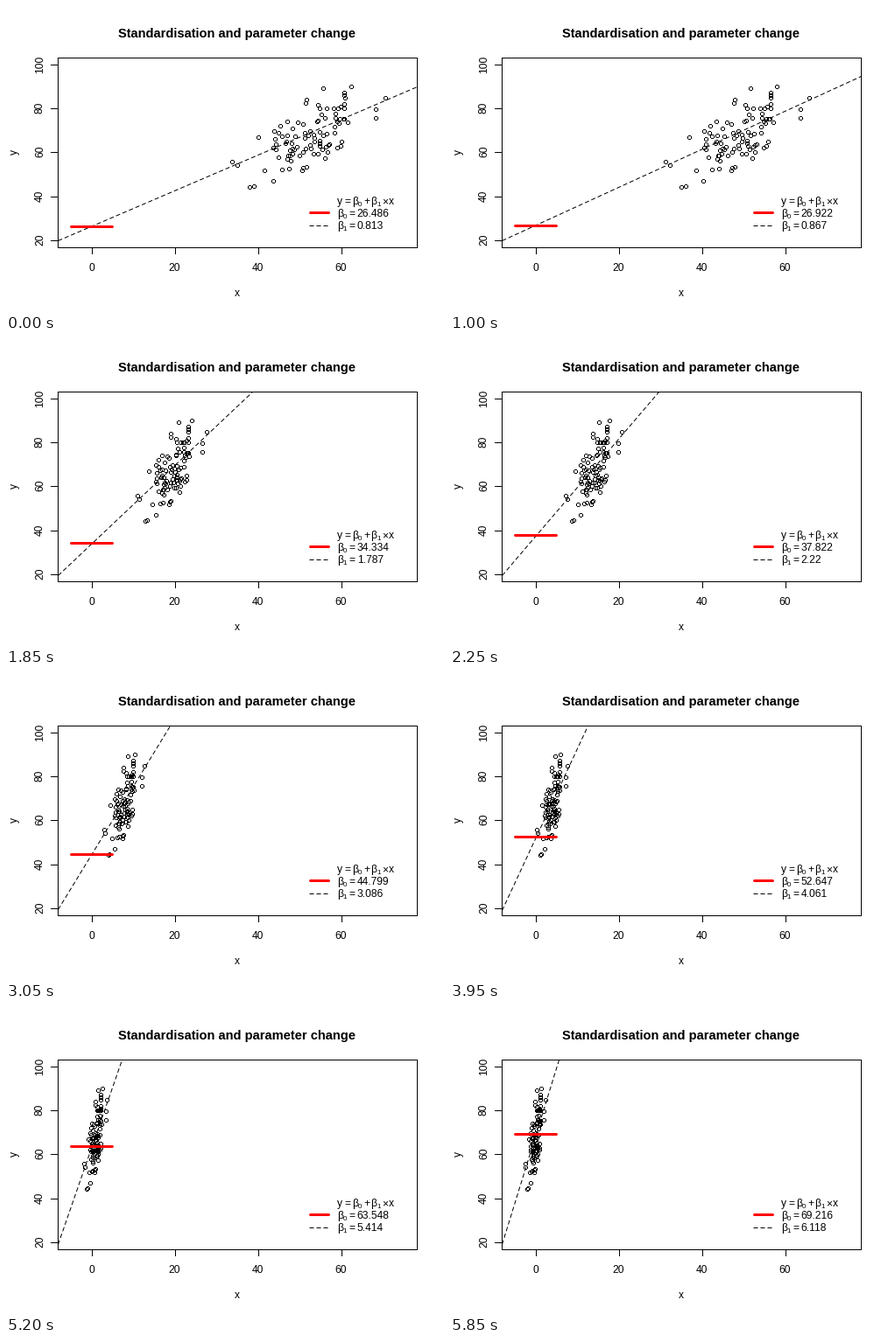
Animation, 500 px wide and 350 px high, one loop 6850 ms. Source, as a matplotlib script:

```python
import numpy as np
import matplotlib.pyplot as plt
from matplotlib.animation import FuncAnimation
from matplotlib.path import Path

W, H, DPI = 500, 350, 100
PX = 72 / DPI  # one pixel in points
STEPS, HOLD, FRAMES, INTERVAL = 98, 20, 137, 50
LEFT, RIGHT, TOP, BOTTOM = 59, 469, 59, 276
X_MIN, X_MAX, Y_MIN, Y_MAX = -8.2, 78.2, 16.8, 103.2
X_SCALE, Y_SCALE = 410.72 / 86.4, 217.52 / 86.4

INTERCEPT = np.linspace(26.4858, 69.216, STEPS + 1)
SLOPE = np.linspace(0.8127, 6.1178, STEPS + 1)

plt.rcParams["font.family"] = "Liberation Sans"
fig = plt.figure(figsize=(W / DPI, H / DPI), dpi=DPI, facecolor="white")
ax = fig.add_axes([0, 0, 1, 1])
ax.set(xlim=(0, W), ylim=(H, 0))
ax.axis("off")


def to_px(x):
    return np.floor(59.04 + (x - X_MIN) * X_SCALE)


def to_py(y):
    return np.floor(276.56 - (y - Y_MIN) * Y_SCALE)


def line(xs, ys, width=1, color="black", **kw):
    return ax.plot(xs, ys, color=color, lw=width * PX, **kw)[0]


def label(x, y, text, size=12, **kw):
    return ax.text(x, y, text, fontsize=size * PX, va="baseline",
                   rotation_mode="anchor", **kw)


def ring_marker():
    """Five pixel wide circle made of four bars."""
    bars = [(-1, 1, 2, 2), (-1, -3, 2, -2), (-2, -2, -1, 1), (2, -2, 3, 1)]
    verts, codes = [], []
    for x0, y0, x1, y1 in bars:
        verts += [(x0, y0), (x1, y0), (x1, y1), (x0, y1), (x0, y0)]
        codes += [Path.MOVETO] + [Path.LINETO] * 3 + [Path.CLOSEPOLY]
    return Path(verts, codes)


def sample():
    """Random cloud around the first fit, plus its few extreme points."""
    rng = np.random.default_rng(12)
    x = rng.triangular(39, 52, 65, 90)
    y = INTERCEPT[0] + SLOPE[0] * x + rng.triangular(-17, 0, 17, 90)
    extremes = [(33.8, 55.8), (35, 54.2), (38, 44.2), (39, 44.6), (43.6, 47),
                (55.6, 89.1), (62.4, 89.9), (68.3, 79.6), (68.3, 75.6),
                (70.6, 84.7)]
    return np.vstack([extremes, np.column_stack([x, y])]).T


def formula(x, y, parts, size=12):
    """Set parts side by side; a leading underscore marks a subscript."""
    widths = {"y": 0.5, "x": 0.5}
    gaps = {"=": 0.2, "+": 0.13, "×": 0.13}
    for part in parts:
        gap = gaps.get(part, 0) * size
        x += gap
        if part[0] == "_":
            label(x, y + 2, part[1:], 8)
            x += 0.39 * size
        else:
            text = label(x, y, part, size)
            x += widths.get(part, 0.549) * size + gap
    return text


sample_x, sample_y = sample()
z = (INTERCEPT[0] + SLOPE[0] * sample_x - INTERCEPT[-1]) / SLOPE[-1]
points, = ax.plot(to_px(sample_x), to_py(sample_y), ls="none",
                  marker=ring_marker(), ms=6 * PX, mfc="black", mew=0)

DASH = dict(ls=(0, (5, 3)), dash_capstyle="butt")
RED = dict(width=3, color="red", solid_capstyle="round")

fit = line([], [], **DASH)
level = line(to_px(np.array([-5, 5])), [252, 252], **RED)

line([LEFT, RIGHT, RIGHT, LEFT, LEFT], [TOP, TOP, BOTTOM, BOTTOM, TOP],
     solid_capstyle="projecting")
for v in range(0, 61, 20):
    line([to_px(v)] * 2, [BOTTOM, 283])
    label(to_px(v) - 0.5, 303, str(v), ha="center")
for v in range(20, 101, 20):
    line([51, LEFT], [to_py(v)] * 2)
    label(42, to_py(v) - 0.5, str(v), ha="center", rotation=90)

label(264, 36, "Standardisation and parameter change", 14.6,
      ha="center", weight="bold")
label(263.5, 332, "x", ha="center")
label(13, 167, "y", ha="center", rotation=90)

line([347, 368], [236, 236], **RED)
line([346, 368], [251, 251], **DASH)
formula(378, 227, ["y", "=", "β", "_0", "+", "β", "_1", "×", "x"])
intercept_text = formula(378, 241, ["β", "_0", "=", "0"])
slope_text = formula(378, 255, ["β", "_1", "=", "0"])


def update(frame):
    step = min(max(frame - HOLD + 1, 0), STEPS)
    b0, b1 = INTERCEPT[step], SLOPE[step]

    # Rescaling x keeps every point's place relative to the fit.
    points.set_xdata(to_px((INTERCEPT[-1] - b0 + SLOPE[-1] * z) / b1))

    ends = np.array([X_MIN, min(X_MAX, (Y_MAX - b0) / b1)])
    fit.set_data(to_px(ends) + 0.5, to_py(b0 + b1 * ends) + 0.5)
    level.set_ydata([to_py(b0)] * 2)

    intercept_text.set_text(f"{b0:.3f}".rstrip("0").rstrip("."))
    slope_text.set_text(f"{b1:.3f}".rstrip("0").rstrip("."))
    return points, fit, level, intercept_text, slope_text


anim = FuncAnimation(fig, update, frames=FRAMES, interval=INTERVAL,
                     repeat=True, repeat_delay=0, blit=False)
plt.show()
```
